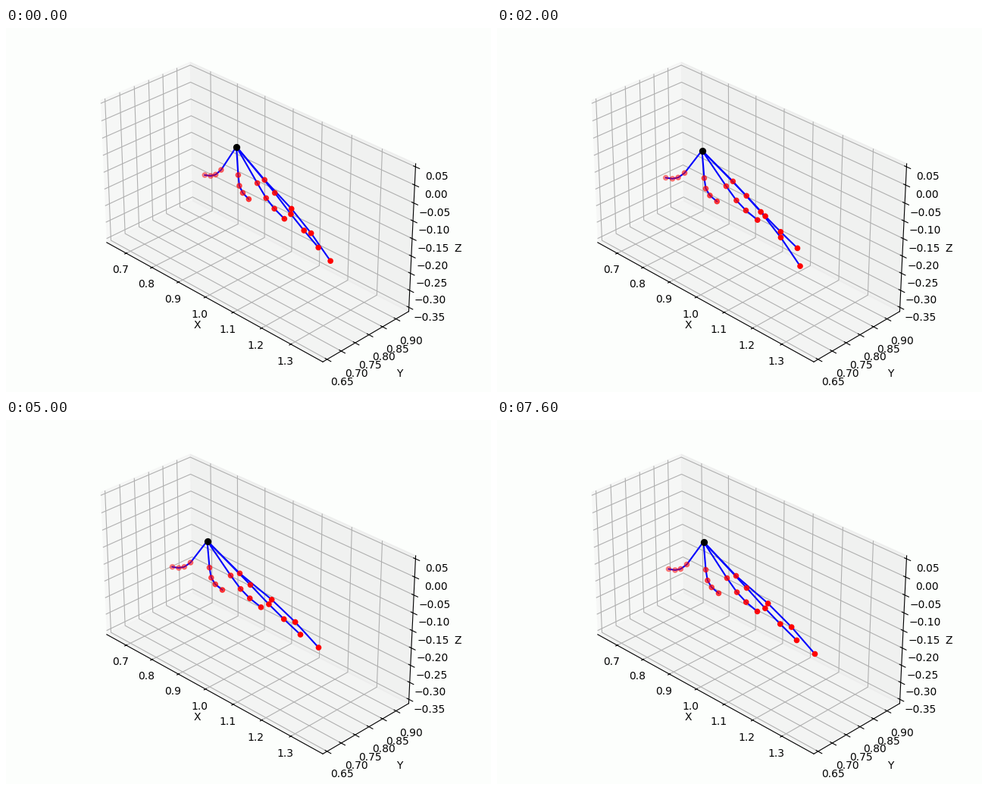
A matplotlib script for the animation above (7.7 s loop, 640x480 px).

```python
import numpy as np
import matplotlib.pyplot as plt
from matplotlib.animation import FuncAnimation

STEP, FRAMES = 100, 77
PAPER = "#fcfefc"

fig = plt.figure(figsize=(6.4, 4.8), dpi=100, facecolor=PAPER)

# Static 3D box, equal scale on all axes
box = fig.add_axes([0, 0, 1, 1], projection="3d", facecolor=PAPER)
box.set(xlabel="X", ylabel="Y", zlabel="Z")
box.set_xticks(np.arange(7, 14) / 10)
box.set_yticks(np.arange(13, 19) / 20)
box.set_zticks(np.arange(-7, 2) / 20)
limits = np.array([(0.6228, 1.4068), (0.635, 0.948), (-0.362, 0.0585)])
box.set(xlim=limits[0], ylim=limits[1], zlim=limits[2])
box.set_box_aspect(np.ptp(limits, axis=1))
box.view_init(elev=30, azim=-45)

# Flat layer in screen pixels for the moving hand
layer = fig.add_axes([0, 0, 1, 1], zorder=5)
layer.set(xlim=(0, 640), ylim=(480, 0))
layer.axis("off")

# Base and tip of each finger, measured from the wrist; the index comes last
OPEN = np.array([(-22, 30, -46, 36), (3, 37, 20, 68), (31, 48, 71, 92),
                 (57, 61, 123, 130), (43, 45, 147, 148)])
BENT = np.array([(-28, 36, -54, 50), (0, 41, 4, 80), (31, 49, 73, 123),
                 (57, 61, 109, 160), (39, 41, 122, 157)])
BOW = np.array([-4, 5, 3, 1, -4])
ALONG = np.array([0, 0.38, 0.68, 1])

# time, wrist x, wrist y, bend of the hand, bend of the index, width, height
KEYS = np.array([
    (0, 304, 156.5, 0.1, 0.3, 0.89, 1),
    (400, 304, 152, 0.1, 0.3, 1.76, 1.9),
    (900, 275, 163.5, 1, 1, 1.1, 1.1),
    (1400, 276.5, 164.5, 1, 1, 1, 1),
    (2000, 270.5, 161.5, 0.05, 0.85, 1.03, 0.98),
    (3300, 264.5, 162.5, 0, 0.2, 1.04, 0.96),
    (4300, 263.5, 160.5, 0.4, 0.4, 1.06, 1),
    (4800, 265.5, 159.5, 0, 0, 1, 0.95),
    (6800, 265.5, 159.5, 0, 0, 1, 0.95),
    (7600, 272.5, 160.5, 0, 0, 1, 1),
])


def joints(bend, index):
    """Four joints per finger, spaced along a bowed line from base to tip."""
    mix = np.array([bend] * 4 + [index])[:, None]
    ends = OPEN + (BENT - OPEN) * mix
    base, reach = ends[:, None, :2], ends[:, None, 2:] - ends[:, None, :2]
    side = reach[..., ::-1] * (-1, 1) / np.linalg.norm(reach, axis=2, keepdims=True)
    f = ALONG[None, :, None]
    return base + reach * f + side * BOW[:, None, None] * 4 * f * (1 - f)


# Joints further left lie deeper in the box and fade
depth = joints(0, 0)[..., 0].ravel()
reds = np.zeros((depth.size, 4))
reds[:, 0] = 1
reds[:, 3] = np.clip(0.6 + 0.0045 * depth, 0.4, 1)

bones = [layer.plot([], [], color="blue", lw=1.5, zorder=2)[0] for _ in BOW]
dots = layer.scatter(depth, depth, s=20, c=reds, zorder=3)
palm = layer.scatter([0], [0], s=32, c="black", zorder=4)


def draw(i):
    t = i % FRAMES * STEP
    x, y, bend, index, width, height = (
        np.interp(t, KEYS[:, 0], col) for col in KEYS[:, 1:].T)
    wrist = np.array([x, y])
    fingers = wrist + joints(bend, index) * (width, height)
    for bone, finger in zip(bones, fingers):
        bone.set_data(*np.vstack([wrist, finger]).T)
    dots.set_offsets(fingers.reshape(-1, 2))
    palm.set_offsets([wrist])
    return [*bones, dots, palm]


anim = FuncAnimation(fig, draw, frames=FRAMES, interval=STEP,
                     init_func=lambda: draw(0), repeat=True, repeat_delay=0)
plt.show()
```
